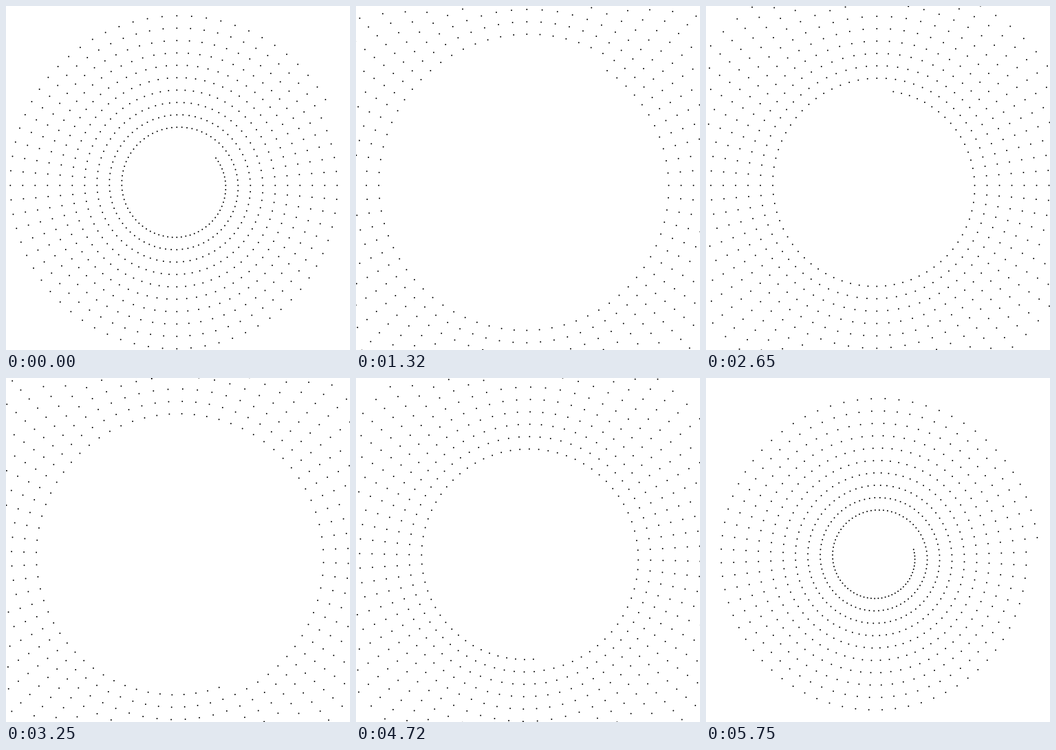
These frames come from a looping animation (500x500 px, 5850 ms). An HTML page with a canvas:

```html
<!DOCTYPE html>
<html lang="en">
<head>
<meta charset="utf-8">
<title>Dotted spiral</title>
<style>
html, body { margin: 0; width: 100%; height: 100%; overflow: hidden; background: #fff; }
canvas { display: block; width: 500px; height: 500px; }
</style>
</head>
<body>
<canvas id="stage" width="500" height="500"></canvas>
<script>
const ctx = document.getElementById("stage").getContext("2d");
const LOOP = 5850;
const CENTER = { x: 248.3, y: 260.7 };
const DOTS = 722;
const STEP = 5;        // degrees between dots
const PITCH = 18;      // radial gap between turns
const R_MIN = 50;
const R_SPAN = 200;

// [time in ms, step number]: the picture moves on in steps
const CLOCK = [[0, 0], [140, 1], [1170, 8], [1320, 9], [2060, 14], [2360, 16],
  [2500, 17], [3250, 22], [3540, 24], [3690, 25], [3840, 26], [4720, 32],
  [4870, 33], [5750, 39]];

// [step number, unwrapped radius, unwrapped angle] of the inner end
const PATH = [[0, 69.25, -35], [9, 203.5, 305], [14, 277.65, 488],
  [22, 398.85, 792], [26, 459.55, 941], [32, 548.3, 1166.3], [39, 654.65, 1428]];

function sample(keys, at, col) {
  const last = keys.length - 1;
  if (at >= keys[last][0]) return keys[last][col];
  let i = 0;
  while (at >= keys[i + 1][0]) i++;
  const a = keys[i], b = keys[i + 1];
  return a[col] + (b[col] - a[col]) * (at - a[0]) / (b[0] - a[0]);
}

function draw(t) {
  const step = Math.floor(sample(CLOCK, t, 1) + 0.01);
  const grown = sample(PATH, step, 1);
  const start = sample(PATH, step, 2);
  const inner = R_MIN + (grown - R_MIN) % R_SPAN;

  ctx.fillStyle = "#fff";
  ctx.fillRect(0, 0, 500, 500);
  ctx.fillStyle = "#000";
  ctx.beginPath();
  for (let i = 0; i < DOTS; i++) {
    const angle = (start + i * STEP) * Math.PI / 180;
    const r = inner + i * STEP * PITCH / 360;
    const x = CENTER.x + r * Math.cos(angle);
    const y = CENTER.y + r * Math.sin(angle);
    ctx.moveTo(x + 1, y);
    ctx.arc(x, y, 1, 0, Math.PI * 2);
  }
  ctx.fill();
}

const begin = performance.now();
function tick() {
  draw((performance.now() - begin) % LOOP);
  requestAnimationFrame(tick);
}
tick();
</script>
</body>
</html>
```
